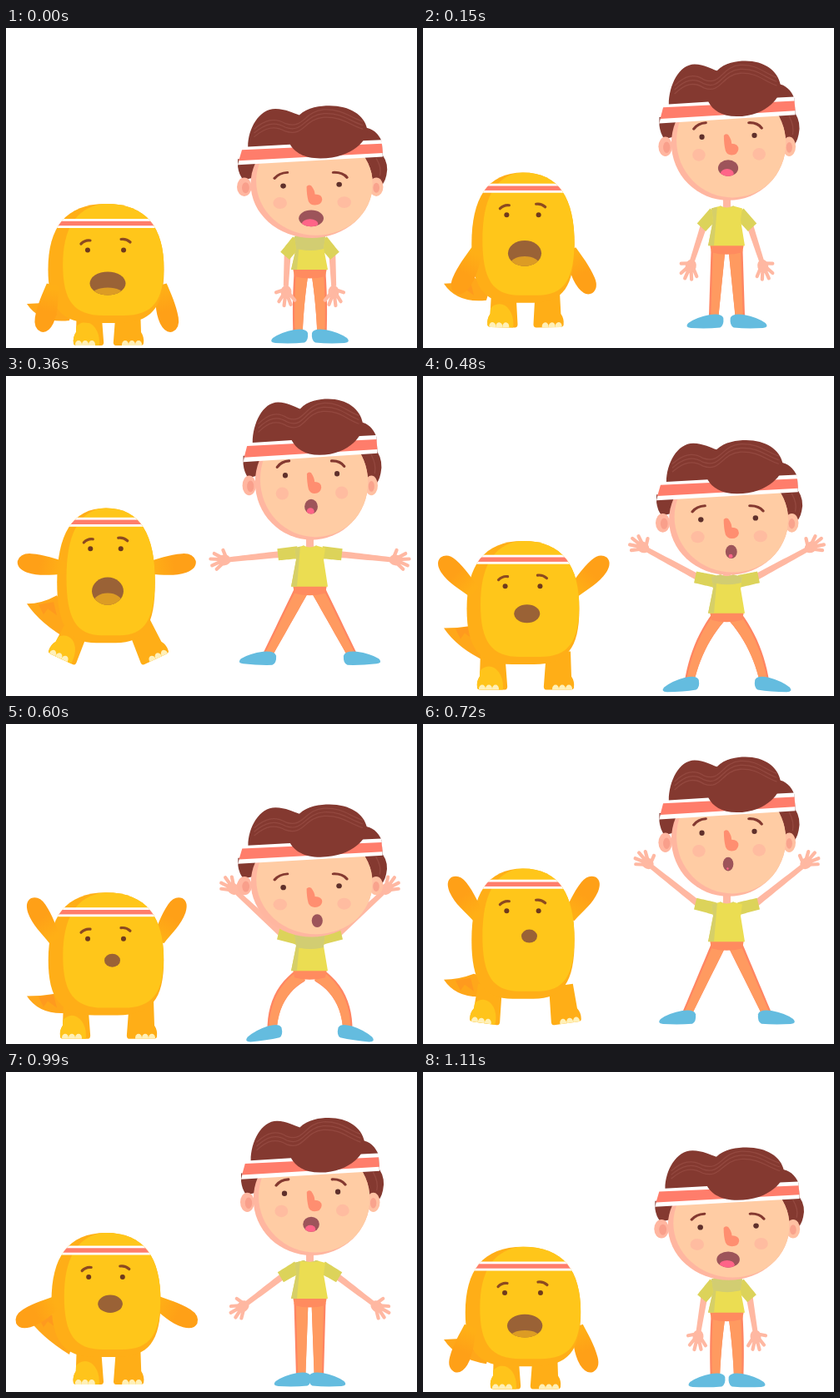
Animation, 493 px wide and 384 px high, one loop 1.14 s. Source, as an HTML page with a canvas:

```html
<!DOCTYPE html>
<html lang="en">
<head>
<meta charset="utf-8">
<title>Jumping jacks</title>
<style>
html, body { margin: 0; width: 100%; height: 100%; overflow: hidden; background: #fff; }
canvas { display: block; width: 493px; height: 384px; }
</style>
</head>
<body>
<canvas id="stage"></canvas>
<script>
const LOOP = 1140, JUMP = LOOP / 2, STEP = 30;
const TAKEOFF = 120, LANDING = 420;
const W = 493, H = 384, BOY_X = 364.5, PET_X = 120;

const rad = deg => deg * Math.PI / 180;
const mix = (a, b, k) => a + (b - a) * k;
const clamp = k => Math.min(1, Math.max(0, k));
const progress = (t, from, to) => clamp((t - from) / (to - from));
const ease = k => (1 - Math.cos(Math.PI * k)) / 2;

const canvas = document.getElementById('stage');
const ratio = window.devicePixelRatio || 1;
canvas.width = W * ratio;
canvas.height = H * ratio;
const g = canvas.getContext('2d');

/* Motion */

function pose(t) {
  const p = t % JUMP;
  const air = progress(p, TAKEOFF, LANDING);
  const lift = 4 * air * (1 - air);
  const ground = clamp((p - LANDING + JUMP) % JUMP / (JUMP - LANDING + TAKEOFF));
  const squat = Math.sin(Math.PI * ground ** 1.2);
  const open = ease(progress(t, 120, 240)) - ease(progress(t, 860, 1000));
  const wide = squat * open;

  // Arms rise steadily and start down slowly; they pass the loop point still falling.
  const raise = t < 30 ? 1 - ease(progress(t + LOOP, 600, 1170) ** 1.4)
    : ease(progress(t, 30, 600)) - ease(progress(t, 600, 1170) ** 1.4);
  const shout = 1 - ease(progress(t, 400, 560)) + ease(progress(t, 860, LOOP));

  // Standing value, plus what a full jump, a crouch and a wide crouch add.
  const blend = (stand, up, down, spread = 0) => stand + up * lift + down * squat + spread * wide;

  return {
    lift, squat, open, wide, raise, shout,
    chin: blend(220, -36.5, 32, 6),
    sx: blend(1.05, -.05, .05),
    sy: blend(.965, .037, -.037),
    look: blend(1, -2, 9, 4),
    neck: blend(226, -35, 21, 4),
    hem: blend(272, -30, 18, 8),
    top: blend(193, -54, 18, -8),
    bot: blend(342, -34, 12, -4),
    hw: blend(65.5, -10.5, 4),
    band: blend(21, -6.5, 2.5),
    tail: 23 + 26 * Math.sin(Math.PI * progress(p, 230, 580))
  };
}

/* Drawing helpers */

function fill(color, d) {
  g.fillStyle = color;
  g.fill(d instanceof Path2D ? d : new Path2D(d));
}

function line(color, width, d) {
  g.strokeStyle = color;
  g.lineWidth = width;
  g.lineCap = 'round';
  g.stroke(new Path2D(d));
}

function oval(x, y, rx, ry = rx) {
  const p = new Path2D();
  p.ellipse(x, y, Math.max(rx, 0), Math.max(ry, 0), 0, 0, 7);
  return p;
}

function within(path, draw) {
  g.save();
  g.clip(path);
  draw();
  g.restore();
}

function placed(x, y, deg, draw) {
  g.save();
  g.translate(x, y);
  g.rotate(rad(deg));
  draw();
  g.restore();
}

function mirrored(x, draw) {
  g.save();
  g.translate(2 * x, 0);
  g.scale(-1, 1);
  draw();
  g.restore();
}

function bothSides(x, draw) {
  draw();
  mirrored(x, draw);
}

// Left-hand point reached from p; 0 degrees is down, 90 is outward.
const reach = (p, deg, len) => [p[0] - Math.sin(rad(deg)) * len, p[1] + Math.cos(rad(deg)) * len];

// Tapered strip along a quadratic curve.
function limb(color, a, c, b, w0, w1) {
  const one = [], two = [];
  for (let i = 0; i <= 12; i++) {
    const u = i / 12, v = 1 - u;
    const at = k => v * v * a[k] + 2 * u * v * c[k] + u * u * b[k];
    const dir = k => v * (c[k] - a[k]) + u * (b[k] - c[k]);
    const s = mix(w0, w1, u) / 2 / (Math.hypot(dir(0), dir(1)) || 1);
    one.push([at(0) - dir(1) * s, at(1) + dir(0) * s]);
    two.unshift([at(0) + dir(1) * s, at(1) - dir(0) * s]);
  }
  fill(color, 'M' + one.concat(two).join('L') + 'Z');
}

const straight = (color, a, b, w0, w1) =>
  limb(color, a, [(a[0] + b[0]) / 2, (a[1] + b[1]) / 2], b, w0, w1);

/* Pet */

function blob(cx, top, bot, hw) {
  const h = bot - top, x = k => cx + hw * k, y = k => top + h * k;
  return new Path2D(`M${cx},${top}
    C${x(.7)},${top} ${x(1)},${y(.2)} ${x(1)},${y(.55)}
    C${x(1)},${y(.87)} ${x(.78)},${bot} ${x(.2)},${bot} L${x(-.2)},${bot}
    C${x(-.78)},${bot} ${x(-1)},${y(.87)} ${x(-1)},${y(.55)}
    C${x(-1)},${y(.2)} ${x(-.7)},${top} ${cx},${top}Z`);
}

function petArm(s) {
  const angle = mix(12, 150, s.raise);
  placed(PET_X - s.hw + 5, s.top + mix(103, 53, s.raise), angle + 90, () => {
    const tint = g.createLinearGradient(0, 0, 45, 0);
    tint.addColorStop(0, '#ffaf16');
    tint.addColorStop(.6, '#ffa017');
    fill(tint, 'M-5,-7 C10,-9 24,-14 40,-11 Q53,-8 53,1 Q51,11 38,12 C22,13 8,10 -5,8Z');
  });
}

function petLeg(s, bright) {
  const x = mix(99, 83, s.open) - 26 * s.lift * s.open;
  const y = 375 + 6 * s.squat - 3 * s.wide - 66 * s.lift ** 1.4;
  placed(x, y, 62 * s.lift ** 2 * s.open, () => {
    const leg = new Path2D('M-14,-46 L-15,-16 Q-19,-10 -18,-3 Q-18,0 -14,0 L15,0 Q19,0 18,-6 L15,-46Z');
    fill('#ffae17', leg);
    within(leg, () => {
      if (bright) fill('#ffc41b', oval(-4, -4, 17, 24));
      for (const toe of [-12, -4, 4]) fill('#fff0b8', oval(toe, -1, 4, 5));
    });
  });
}

function drawTail(s) {
  const x = 25, y = s.bot - s.tail;
  fill('#ffa71a', `M${x},${y} Q${x + 18},${y} ${x + 36},${y - 3 - 11 * s.lift}
    L82,${s.bot - 24} L76,${s.bot - 3} Q${x + 16},${y + 24} ${x},${y}Z`);
  fill('#ff9a1e', `M${x + 14},${y + 1} L${x + 32},${y - 2}
    L${x + 36},${y + 14} L${x + 25},${y + 6} L${x + 20},${y + 13}Z`);
}

function drawPet(s) {
  drawTail(s);
  mirrored(PET_X + .8, () => petArm(s));
  petLeg(s, true);
  mirrored(123, () => petLeg(s, false));

  const body = blob(PET_X, s.top, s.bot, s.hw);
  const bandY = s.top + s.band, eyeY = bandY + 32, span = s.hw * .31;
  const shade = 9 + (s.hw - 55) * .6;
  fill('#ffae17', body);
  within(body, () => {
    fill('#ffc61a', blob(PET_X + shade / 2, s.top - 1, s.bot - 9, s.hw - shade / 2));
  });
  petArm(s);
  within(body, () => {
    g.fillStyle = '#fff';
    g.fillRect(0, bandY - 5.5, 250, 11);
    g.fillStyle = '#ff7d6b';
    g.fillRect(0, bandY - 2.7, 250, 5.4);
  });

  const left = 119.5 - span, right = 119.5 + span;
  fill('#6f3a1d', oval(left, eyeY, 3));
  fill('#6f3a1d', oval(right, eyeY, 3));
  line('#8c4a20', 3.2, `M${left - 8},${eyeY - 7.5} Q${left - 3},${eyeY - 12.5} ${left + 3},${eyeY - 11.5}`);
  line('#8c4a20', 3.2, `M${right - 3},${eyeY - 13} Q${right + 3},${eyeY - 14} ${right + 8},${eyeY - 9.5}`);

  const x = mix(127.5, 122, s.shout);
  const y = eyeY + mix(26 + 12 * s.lift, 40 + 17 * s.lift, s.shout);
  const rx = mix(9.5, 21.5 - 4 * s.lift, s.shout), ry = mix(8, 14 + 4 * s.lift, s.shout);
  const tongue = .35 - .32 * s.lift + 1.5 * (1 - s.shout);
  const mouth = oval(x, y, rx, ry);
  fill('#9a6236', mouth);
  within(mouth, () => fill('#dc9c24', oval(x, y + ry * (tongue + .7), rx * .92, ry * .7)));
}

/* Boy */

function boyLeg(s) {
  const hip = [354, s.hem + 5];
  const ankle = [mix(354 - 4 * s.squat, 319 - 11 * s.lift, s.open), 368 + s.squat - 47 * s.lift];
  const bow = 2 * s.squat + 16 * s.wide;
  const knee = [(hip[0] + ankle[0]) / 2 - bow, (hip[1] + ankle[1]) / 2 - bow * .7];
  const inner = p => [p[0] + 1.2, p[1]];
  limb('#ff8562', hip, knee, ankle, 17, 11);
  limb('#ff9a60', inner(hip), inner(knee), inner(ankle), 14.5, 9);
  placed(...ankle, 20 * s.lift ** 4 * s.open - 8 * s.wide, () => {
    fill('#64bcdf', 'M12,-3 Q13,6 8,8.5 Q-8,10 -27,9 Q-35,8 -30,3 Q-20,-4 -4,-7 Q10,-9 12,-3Z');
  });
}

function boyArm(s) {
  const shoulder = [350, s.neck + 8], skin = '#ffb8a2';
  const bend = mix(40, 104, s.raise ** 2 * (3 - 2 * s.raise));
  const cuff = reach(shoulder, bend, 24);
  const wrist = reach(shoulder, mix(13, 127, s.raise), 54 + 37 * s.raise ** .6);
  straight(skin, reach(shoulder, bend, 19), wrist, 8, 6);
  const heading = Math.atan2(wrist[1] - cuff[1], wrist[0] - cuff[0]) * 180 / Math.PI;
  placed(...wrist, heading, () => {
    fill(skin, oval(7, 0, 8, 6.5));
    line(skin, 4.2, 'M4,2 L7,12 M9,3 L18,9 M10,1 L23,3 M10,-1 L22,-5 M8,-3 L17,-10');
  });
  straight('#dcd35a', shoulder, cuff, 15, 14);
}

function drawBody(s) {
  bothSides(BOY_X, () => boyLeg(s));
  fill('#ff8b5f', `M344,${s.hem - 2} H385 L383,${s.hem + 8} Q364,${s.hem + 13} 346,${s.hem + 8}Z`);
  bothSides(BOY_X, () => boyArm(s));
  g.fillStyle = '#ffb8a2';
  g.fillRect(360, s.chin - 6, 9, s.neck - s.chin + 10);
  const shirt = new Path2D(`M357,${s.neck} Q364,${s.neck + 4} 372,${s.neck}
    L383,${s.neck + 3} L381,${s.neck + 17} L386,${s.hem} H342 L348,${s.neck + 17} L346,${s.neck + 3}Z`);
  fill('#ebdd52', shirt);
  within(shirt, () => {
    fill('#d6cf68', `M340,${s.neck} H353 L349,${s.hem} H340Z`);
    fill('#d2cd72', oval(365, s.chin + 8 + s.squat * 7 - 68, 66, 68));
  });
}

function drawFace(s) {
  const brown = '#5f302b', brow = '#843930';
  const shifted = (k, draw) => placed(0, s.look * k / s.sy, 0, draw);
  shifted(1, () => {
    fill(brown, oval(335.5, 109, 3, 3.3));
    fill(brown, oval(396.5, 107, 3, 3.3));
    line(brow, 3.2, 'M326,99 Q331,92 340,91.5');
    line(brow, 3.2, 'M390,91.5 Q400,91 405,98');
    g.globalAlpha = .6;
    fill('#ffb09f', oval(332, 131, 7.5));
    fill('#ffb09f', oval(402, 130, 7.5));
    g.globalAlpha = 1;
  });
  shifted(1.25, () => {
    fill('#ff8e70', `M361,107 Q363,104 366,106 Q370,112 370,117
      Q378,117 378,124 Q377,131 370,131 Q365,131 363,126 Q361,118 361,107Z`);
  });
  shifted(1.35, () => {
    const open = 1 - Math.sqrt(s.raise);
    const x = 366 + 7 * s.wide, y = 147, rx = 6 + 8.5 * open, ry = 8.5 + 2.3 * open;
    const tongue = Math.sqrt(Math.max(0, 1 - s.raise ** 3));
    const mouth = oval(x, y, rx, ry);
    fill('#9d545a', mouth);
    within(mouth, () => {
      fill('#ff6488', oval(x - rx * .1, y + ry * .65, rx * .65 * tongue, ry * .55 * tongue));
    });
  });
}

function drawHead(s) {
  const hair = '#843930', strand = '#93483f';
  g.save();
  g.translate(365, s.chin);
  g.scale(s.sx, s.sy);
  g.translate(-365, -187);

  fill(hair, 'M286,85 V95 Q287,105 292,112 L306,108 V85Z');
  fill(hair, 'M400,40 L424,44 Q437,46 443,62 L444,80 Q451,92 448,106 Q446,117 440,122 L424,100Z');
  line(strand, 1.3, 'M437,84 Q443,96 441,106');
  fill('#ffb6a0', oval(293, 121, 8, 12));
  fill('#f99f8b', oval(294.5, 122, 4, 7));
  fill('#ffc0a2', oval(437, 121, 7.5, 12));
  fill('#f9a38d', oval(437, 122, 3.5, 6.5));

  const head = oval(366.5, 117, 66.5, 70);
  fill('#ffb6a0', head);
  within(head, () => fill('#ffcca4', oval(371, 113.5, 65, 70)));
  drawFace(s);

  fill('#fff', 'M291,68 L443,60 L444,82 L286,92.5Z');
  fill('#ff7d6b', 'M290.5,73 L443,65 L444,77 L287,87Z');
  fill(hair, `M297,69 C297,46 309,20 327,20 C338,20 347,26 353,28
    C362,18 376,16 386,16 C408,16 424,28 427,46 C429,58 412,84 376,84
    C358,84 348,76 343,66Z`);
  for (const dy of [-3, 2, 7]) {
    line(strand, 1.3, `M304,${49 + dy} C316,${37 + dy} 326,${34 + dy} 338,${42 + dy}
      C358,${50 + dy} 358,${26 + dy} 380,${24 + dy} C400,${23 + dy} 408,${34 + dy} 422,${39 + dy}`);
  }
  g.restore();
}

function draw(time) {
  // The first picture is held for two steps.
  const at = time % LOOP;
  const s = pose(at < 2 * STEP ? 0 : Math.floor(at / STEP) * STEP);
  g.setTransform(ratio, 0, 0, ratio, 0, 0);
  g.fillStyle = '#fff';
  g.fillRect(0, 0, W, H);
  g.save();
  g.beginPath();
  g.rect(8, 0, W - 8, H);
  g.clip();
  drawPet(s);
  drawBody(s);
  drawHead(s);
  g.restore();
}

const start = performance.now();
function tick() {
  draw(performance.now() - start);
  requestAnimationFrame(tick);
}
tick();
</script>
</body>
</html>
```
